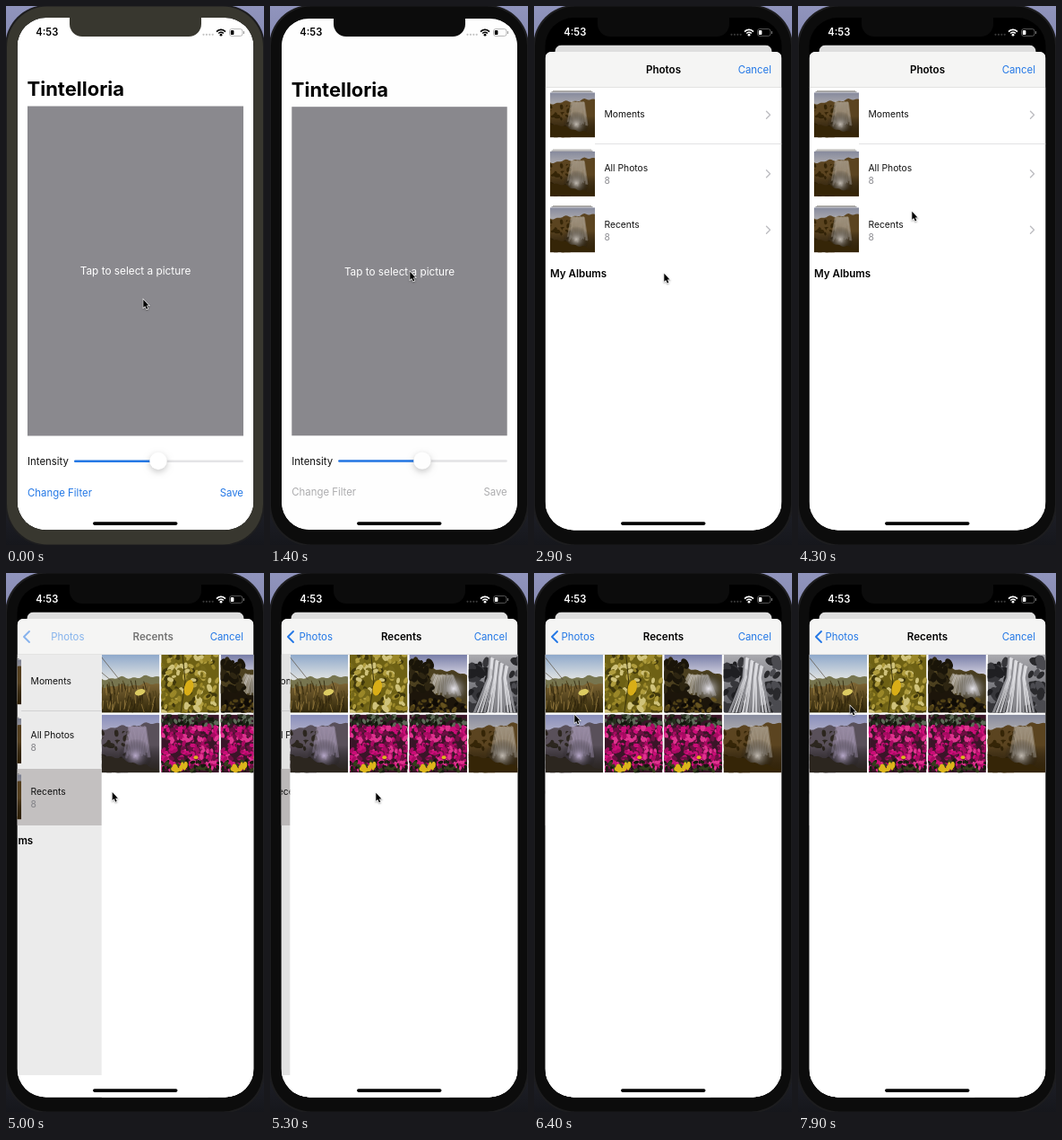
An HTML page with a canvas for the animation above (8 s loop, 288x600 px).

```html
<!DOCTYPE html>
<html lang="en">
<head>
<meta charset="utf-8">
<title>Photo picker</title>
<style>
  html, body { margin: 0; width: 100%; height: 100%; overflow: hidden; background: #000; }
  canvas { display: block; width: 288px; height: 600px; }
</style>
</head>
<body>
<canvas id="stage"></canvas>
<script>
const LOOP = 8000, STEP = 100;
const LEFT = 12.5, TOP = 13, WIDTH = 264, HEIGHT = 570.5, MID = 144.5;
const SHEET_TOP = 51, LIST_TOP = 91;
const BODY = 11.4, SMALL = 10.3, HEAD = 11.6;
const BLUE = '#2478e6';
const TAP_AT = 1300, SHEET_AT = 1372, LIST_AT = 2100, PRESS_AT = 4700, PUSH_AT = 4772;

// Each pointer move: start time and where it ends
const MOVE_TIME = 800;
const MOVES = [
  [100, 156, 295], [1600, 145, 297], [3300, 127, 228],
  [4300, 118, 244], [5300, 45, 157], [7000, 58, 147]
];

const canvas = document.getElementById('stage');
const c = canvas.getContext('2d');
const dpr = window.devicePixelRatio || 1;
canvas.width = 288 * dpr;
canvas.height = 600 * dpr;

const clamp = v => Math.max(0, Math.min(1, v));
const mix = (a, b, p) => a + (b - a) * p;
const smooth = p => p * p * (3 - 2 * p);

// critically damped spring from 0 to 1
function spring(ms) {
  const k = Math.max(0, ms) * 0.0096;
  return 1 - (1 + k) * Math.exp(-k);
}

function seeded(seed) {
  return () => (seed = (seed * 16807) % 2147483647) / 2147483647;
}

function rect(color, x, y, w, h) {
  c.fillStyle = color;
  c.fillRect(x, y, w, h);
}

function roundPath(x, y, w, h, r) {
  c.beginPath();
  c.roundRect(x, y, w, h, r);
}

function round(color, ...box) {
  roundPath(...box);
  c.fillStyle = color;
  c.fill();
}

function text(str, x, y, size, color, weight = 400, align = 'left') {
  c.font = `${weight} ${size}px Inter, sans-serif`;
  c.textAlign = align;
  c.fillStyle = color;
  c.fillText(str, x, y);
}

function line(color, width, ...pts) {
  c.beginPath();
  for (let i = 0; i < pts.length; i += 2) c.lineTo(pts[i], pts[i + 1]);
  c.strokeStyle = color;
  c.lineWidth = width;
  c.lineCap = c.lineJoin = 'round';
  c.stroke();
}

function dot(color, x, y, rx, ry = rx, turn = 0) {
  c.beginPath();
  c.ellipse(x, y, rx, ry, turn, 0, 7);
  c.fillStyle = color;
  c.fill();
}

function fade(y0, y1, ...colors) {
  const g = c.createLinearGradient(0, y0, 0, y1);
  colors.forEach((col, i) => g.addColorStop(i / (colors.length - 1), col));
  return g;
}

function group(draw) {
  c.save();
  draw();
  c.restore();
}

// Pictures, each on a square tile of this side

const SIDE = 65;

const sky = (...colors) => rect(fade(0, 30, ...colors), 0, 0, SIDE, SIDE);

// land from a wavy crest, running from height a to height b, down to the bottom
function land(color, a, b, wave = 2) {
  c.beginPath();
  c.moveTo(0, SIDE);
  for (let x = 0; x <= SIDE; x += 2.5)
    c.lineTo(x, mix(a, b, x / SIDE) + wave * Math.sin(x * 0.35) * Math.cos(x * 0.13));
  c.lineTo(SIDE, SIDE);
  c.fillStyle = color;
  c.fill();
}

function scatter(seed, n, colors, x0, x1, y0, y1, size) {
  const rnd = seeded(seed);
  for (let i = 0; i < n; i++) {
    const r = size * (0.6 + rnd() * 0.7);
    dot(colors[i % colors.length], mix(x0, x1, rnd()), mix(y0, y1, rnd()), r, r * 0.6, rnd() * 3);
  }
}

// falling water as thin streaks that spread towards the foot
function veil(color, x0, x1, top, foot, spread) {
  const rnd = seeded(7);
  c.globalAlpha = 0.4;
  for (let p = 0; p <= 1; p += 0.06) {
    const x = mix(x0, x1, p);
    line(color, 2.4, x, top + rnd() * 2, x + spread * (p - 0.5), foot - rnd() * 9);
  }
  c.globalAlpha = 1;
}

function mist(color, x, y, r) {
  const g = c.createRadialGradient(x, y, 0, x, y, r);
  g.addColorStop(0, color);
  g.addColorStop(1, 'transparent');
  rect(g, x - r, y - r, 2 * r, 2 * r);
}

function meadow() {
  sky('#8fa9cb', '#e8e8e4');
  land('#77754f', 27, 24);
  land(fade(32, SIDE, '#7d6534', '#2e2509'), 36, 32);
  const rnd = seeded(9);
  for (let i = 0; i < 90; i++) {
    const x = rnd() * SIDE, y = 38 + rnd() * 27;
    line(['#4a3c16', '#93793d', '#2d230b'][i % 3], 0.8, x, y, x + rnd() * 6 - 3, y - 9);
  }
  line('#5a5040', 0.7, 0, 3, 20, 28);
  line('#5a5040', 0.7, 0, 20, 12, 30);
  dot('#dccb62', 43, 42, 6, 3.4, -0.3);
}

function leaves() {
  rect('#6e6114', 0, 0, SIDE, SIDE);
  scatter(21, 150, ['#9a8728', '#40380b', '#b09d3e', '#75681a', '#cfc27a'], 0, SIDE, 0, SIDE, 4);
  line('#3b330a', 1, 24, 0, 27, 30, 22, SIDE);
  dot('#d9ae17', 31, 37, 5, 9, 0.25);
}

function cliffFall() {
  sky('#787ea8', '#eeeaf0');
  land('#4c401f', 10, 22);
  veil('#f8f5fb', 28, 50, 22, 48, 18);
  mist('rgba(240,238,246,.95)', 50, 38, 20);
  land('#1c150a', 32, 56, 3);
  scatter(4, 40, ['#1a1509', '#2e2612'], 0, 24, 8, 40, 5);
  scatter(5, 45, ['#4d3e15', '#0f0b05', '#66531f'], 0, SIDE, 50, SIDE, 3);
}

function greyFall() {
  rect(fade(0, SIDE, '#a9a9ae', '#55555a'), 0, 0, SIDE, SIDE);
  scatter(12, 28, ['#1f1f22', '#36363a'], 0, 22, 8, SIDE, 7);
  scatter(17, 28, ['#29292c', '#4b4b50'], 46, SIDE, 6, SIDE, 7);
  for (let i = 0; i < 13; i++) {
    const x = 24 + i * 1.8;
    line(i % 3 ? 'rgba(236,236,240,.75)' : '#8d8d92', 2.6, x, 3 + i, x - 2, 26, x * 2.1 - 44, SIDE);
  }
}

function wideFall(high, haze, rock, low, water) {
  sky(high, haze);
  land(rock, 16, 9);
  scatter(14, 50, [rock, low], 0, 30, 20, SIDE, 4);
  rect(fade(34, SIDE, 'transparent', low), 0, 34, SIDE, 31);
  veil(water, 31, 50, 13, 50, 10);
  mist(water, 38, 46, 19);
  land(low, 44, 62);
}

const violetFall = () => wideFall('#888ebb', '#c4bfcf', '#59505a', '#2c261f', '#b9aacb');
const brownFall = () => wideFall('#868a9d', '#c6c1bb', '#5b4420', '#352507', '#c2bbb2');

function flowers() {
  rect('#3a1528', 0, 0, SIDE, SIDE);
  scatter(33, 70, ['#5e6a58', '#11170c', '#252d1d'], 0, SIDE, 0, 13, 3);
  scatter(34, 260, ['#cb0d78', '#a80a62', '#e0338f', '#6c0f42'], 0, SIDE, 13, 62, 3);
  scatter(35, 50, ['#1a1f10', '#34401c', '#141a0c'], 0, SIDE, 52, SIDE, 2.6);
  scatter(36, 9, ['#dcb51b'], 12, 28, 54, 62, 4);
  dot('#dcb51b', 39, 48, 2.5, 2);
}

const GRID = [meadow, leaves, cliffFall, greyFall, violetFall, flowers, flowers, brownFall];

function tile(draw, x, y, side) {
  group(() => {
    c.beginPath();
    c.rect(x, y, side, side);
    c.clip();
    c.translate(x, y);
    c.scale(side / SIDE, side / SIDE);
    draw();
  });
}

// Screens

function editor(active) {
  rect('#fff', LEFT, TOP, WIDTH, HEIGHT);
  text('Tintelloria', 23.5, 100, 22, '#000', 700);
  rect('#8a898e', 24, 111.5, 241, 367);
  text('Tap to select a picture', MID, 299.3, 11.8, '#fff', 400, 'center');
  text('Intensity', 24, 511, BODY, '#111');
  round('#e4e4e6', 76, 505.5, 189, 2.6, 1.3);
  round(BLUE, 76, 505.5, 94, 2.6, 1.3);
  group(() => {
    c.shadowColor = 'rgba(0,0,0,.22)';
    c.shadowBlur = 7 * dpr;
    c.shadowOffsetY = 2.5 * dpr;
    dot('#fff', 170, 506.5, 9.7);
  });
  const tint = active ? BLUE : '#adadaf';
  text('Change Filter', 24, 545.8, BODY, tint);
  text('Save', 265, 545.8, BODY, tint, 400, 'right');
}

function chevron(x, y, dir, h, color, width) {
  line(color, width, x, y - h, x + dir * h, y, x, y + h);
}

function albumRow(name, count, top) {
  rect('#b3b1ac', 21, top, 43, 1);
  rect('#8b8a8d', 19.5, top + 1.2, 46, 1);
  tile(brownFall, 18, top + 2.3, 50);
  const base = top + (count ? 24.5 : 30.3);
  text(name, 78.5, base, SMALL, '#111');
  text(count, 78.5, base + 14, SMALL, '#8e8e93');
  chevron(259.5, top + 27.3, 1, 4, '#bdbdc2', 1.4);
}

function page(draw, x) {
  group(() => {
    c.translate(x, 0);
    rect('#fff', LEFT, LIST_TOP, WIDTH, HEIGHT);
    draw();
  });
}

function albums(pressed) {
  if (pressed) rect('#d3d0d0', LEFT, 218, WIDTH, 63);
  albumRow('Moments', '', 94);
  rect('#dcdcde', 68, 153, 209, 0.8);
  albumRow('All Photos', '8', 159.5);
  albumRow('Recents', '8', 222);
  text('My Albums', 18, 301.8, HEAD, '#000', 600);
}

function grid() {
  GRID.forEach((draw, i) =>
    tile(draw, LEFT + (i % 4) * 66.4, LIST_TOP + Math.floor(i / 4) * 66.6, 64.6));
}

function navBar(push, filled) {
  rect('#f5f5f4', LEFT, SHEET_TOP, WIDTH, 40);
  rect('#d8d8d8', LEFT, 90.4, WIDTH, 0.6);
  if (!filled) return;
  const base = 75.2, shift = 55 * (1 - push);
  c.globalAlpha = clamp(1 - push * 1.6);
  text('Photos', MID - 90 * push, base, HEAD, '#000', 600, 'center');
  c.globalAlpha = clamp(push * 1.6 - 0.5);
  chevron(26, 71, -1, 6, BLUE, 1.9);
  text('Photos', 30.5 + shift, base, BODY, BLUE);
  text('Recents', MID + shift, base, HEAD, '#000', 600, 'center');
  c.globalAlpha = 1;
  text('Cancel', 265, base, BODY, BLUE, 400, 'right');
}

function picker(t) {
  const push = spring(t - PUSH_AT);
  const ahead = WIDTH * (1 - push);
  page(() => albums(t >= PRESS_AT), -0.3 * WIDTH * push);
  rect('#fff', LEFT + ahead, LIST_TOP, WIDTH, HEIGHT);
  rect(`rgba(0,0,0,${0.12 * push})`, LEFT, LIST_TOP, ahead, 468);
  if (push) page(grid, ahead);
  navBar(push, true);
}

function sheet(t, p) {
  group(() => {
    c.translate(0, 560 * (1 - p));
    roundPath(LEFT, SHEET_TOP, WIDTH, HEIGHT, 7);
    c.clip();
    rect('#fff', LEFT, SHEET_TOP, WIDTH, HEIGHT);
    if (t < LIST_AT) navBar(0, false);
    else picker(t);
  });
}

function backCard(t, p) {
  const scale = mix(1, 0.918, p);
  group(() => {
    c.translate(MID, mix(TOP, 43.5, p));
    c.scale(scale, scale);
    c.translate(-MID, -TOP);
    roundPath(LEFT, TOP, WIDTH, HEIGHT, mix(32, 8, clamp(p * 2)));
    c.clip();
    editor(t < TAP_AT);
    rect(`rgba(0,0,0,${0.13 * p})`, LEFT, TOP, WIDTH, HEIGHT);
  });
}

function statusBar(t) {
  const p = clamp((t - 1500) / 450);
  const grey = v => `rgb(${v},${v},${v})`;
  const ink = grey(255 * p), dim = grey(mix(165, 110, p));
  text('4:53', 33.3, 33.4, 11.2, ink, 600);
  for (let i = 0; i < 4; i++) dot(grey(mix(196, 56, p)), 220.5 + i * 3.4, 31.8, 1.1);
  c.lineCap = 'butt';
  c.strokeStyle = ink;
  c.lineWidth = 1.6;
  for (const r of [3.7, 6.6]) {
    c.beginPath();
    c.arc(240, 33, r, -Math.PI * 0.77, -Math.PI * 0.23);
    c.stroke();
  }
  dot(ink, 240, 32.2, 1.4);
  roundPath(249.5, 25.6, 14.5, 7.8, 2.4);
  c.strokeStyle = dim;
  c.lineWidth = 0.8;
  c.stroke();
  round(ink, 250.8, 26.9, 3.6, 5.2, 1.2);
  round(dim, 264.9, 28, 1.2, 3, 0.6);
}

const ARROW = new Path2D('M0 0v9l2-1.8 1.5 3.4 1.5-.6-1.5-3.4h2.7z');

function pointer(t) {
  let x = 153, y = 326;
  for (const [start, toX, toY] of MOVES) {
    const p = smooth(clamp((t - start) / MOVE_TIME));
    x = mix(x, toX, p);
    y = mix(y, toY, p);
  }
  group(() => {
    c.translate(x + 0.3, y + 0.8);
    c.shadowColor = 'rgba(0,0,0,.35)';
    c.shadowBlur = 2 * dpr;
    c.shadowOffsetY = dpr;
    c.strokeStyle = '#fff';
    c.lineWidth = 1.2;
    c.stroke(ARROW);
    c.shadowColor = 'transparent';
    c.fillStyle = '#000';
    c.fill(ARROW);
  });
}

function draw(t) {
  const bezel = t < 1200 ? '#38372f' : '#0c0c0c';
  const p = spring(t - SHEET_AT);
  c.setTransform(dpr, 0, 0, dpr, 0, 0);
  rect(fade(0, 600, '#9094bd', '#50536f', '#16171c'), 0, 0, 288, 600);
  round('#1d1d1f', -1, -1, 290, 602, 46);
  round(bezel, 1, 0.5, 286, 599, 45);
  group(() => {
    roundPath(LEFT, TOP, WIDTH, HEIGHT, 32);
    c.clip();
    rect('#000', 0, 0, 288, 600);
    backCard(t, p);
    if (p) sheet(t, p);
  });
  round(bezel, 71, 10, 147, 24, [0, 0, 14, 14]);
  statusBar(t);
  round('#000', 97, 574.3, 94.5, 3.6, 1.8);
  pointer(t);
}

let shown = -1;
function tick(now) {
  const t = Math.floor((now % LOOP) / STEP) * STEP;
  if (t !== shown) draw(shown = t);
  requestAnimationFrame(tick);
}
draw(0);
requestAnimationFrame(tick);
</script>
</body>
</html>
```
